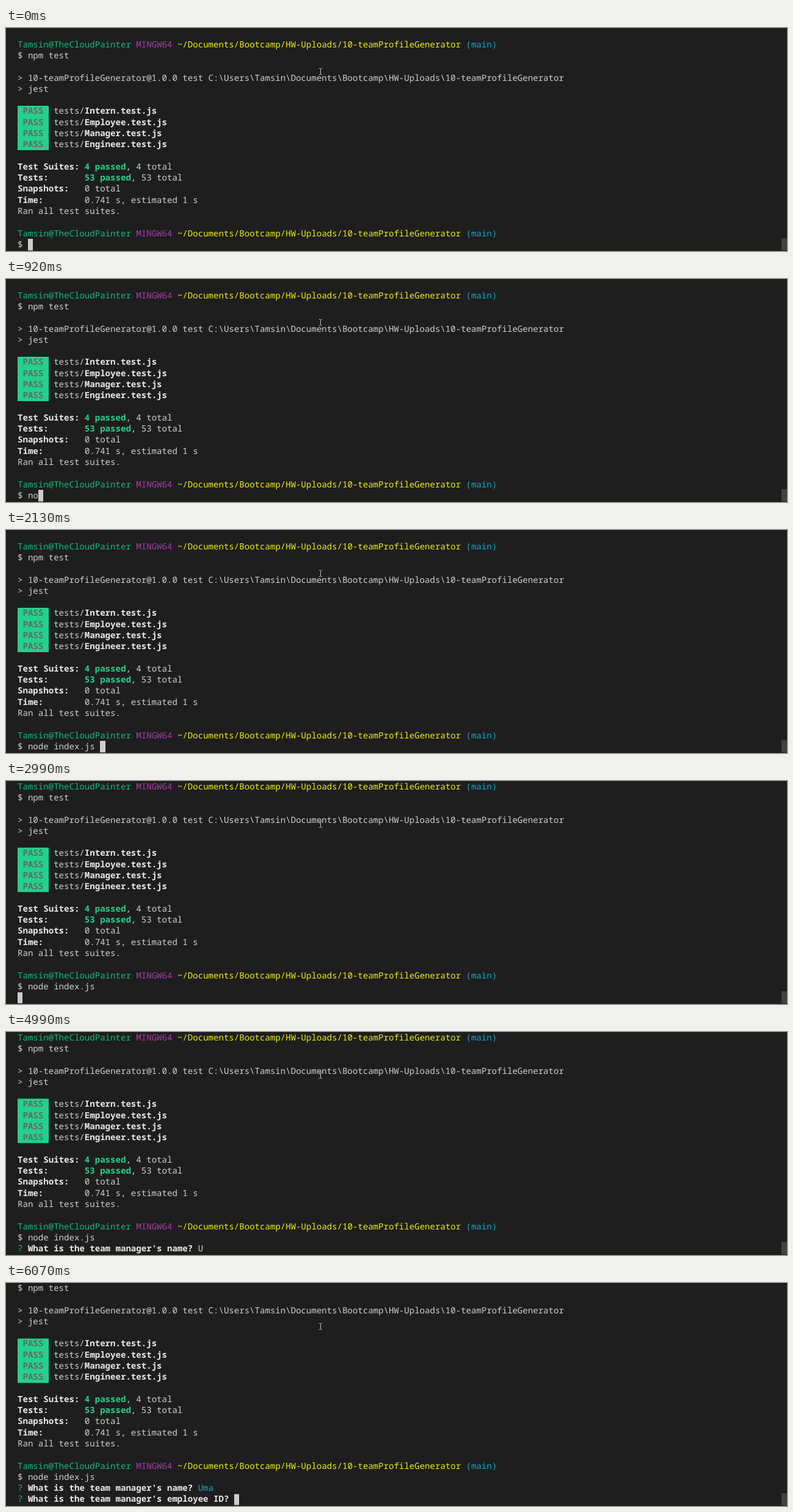
These frames come from a looping animation (1280x367 px, 8 s). An HTML page:

```html
<!DOCTYPE html>
<html lang="en">
<head>
<meta charset="utf-8">
<title>Terminal</title>
<style>
  :root { --row: 18.28px; --col: 8.448px; }
  html, body { margin: 0; width: 100%; height: 100%; overflow: hidden; background: #1e1e1e; }
  body { position: relative; }
  #screen { position: absolute; left: 19px; top: 18.3px; }
  pre {
    position: relative; top: .5px; margin: 0; color: #d0d0d0;
    font: 500 14.08px/var(--row) "Noto Sans Mono", monospace;
    text-rendering: geometricPrecision; font-variant-ligatures: none;
  }
  b { color: #e9e9e9; }
  .user { color: #0dbc79; }
  .sys { color: #a83ca8; }
  .path { color: #eded12; }
  .cyan { color: #11a8cd; }
  .ok { color: #23d18b; }
  .tag { color: #666; }
  #badge, #cursor { position: absolute; left: 0; height: var(--row); }
  #badge { top: calc(6 * var(--row)); width: calc(6 * var(--col)); height: calc(4 * var(--row)); background: #23d18b; }
  #cursor { width: var(--col); background: #ccc; }
  #slider { position: absolute; left: 1271px; top: 346px; width: 9px; height: 20px; background: #424242; }
  #pointer { position: absolute; left: 511px; top: 65px; }
</style>
</head>
<body>
<div id="screen">
<div id="badge"></div>
<pre><span class="user">Tamsin@TheCloudPainter</span> <span class="sys">MINGW64</span> <span class="path">~/Documents/Bootcamp/HW-Uploads/10-teamProfileGenerator</span> <span class="cyan">(main)</span>
$ npm test

&gt; 10-teamProfileGenerator@1.0.0 test C:\Users\Tamsin\Documents\Bootcamp\HW-Uploads\10-teamProfileGenerator
&gt; jest

<b class="tag"> PASS </b> tests/<b>Intern.test.js</b>
<b class="tag"> PASS </b> tests/<b>Employee.test.js</b>
<b class="tag"> PASS </b> tests/<b>Manager.test.js</b>
<b class="tag"> PASS </b> tests/<b>Engineer.test.js</b>

<b>Test Suites: </b><b class="ok">4 passed</b>, 4 total
<b>Tests:       </b><b class="ok">53 passed</b>, 53 total
<b>Snapshots:   </b>0 total
<b>Time:        </b>0.741 s, estimated 1 s
Ran all test suites.

<span class="user">Tamsin@TheCloudPainter</span> <span class="sys">MINGW64</span> <span class="path">~/Documents/Bootcamp/HW-Uploads/10-teamProfileGenerator</span> <span class="cyan">(main)</span>
$ <span id="command"></span>
<span id="askName"><span class="user">?</span> <b>What is the team manager's name?</b> <span id="answer"></span></span>
<span id="askId"><span class="user">?</span> <b>What is the team manager's employee ID?</b> </span></pre>
<div id="cursor"></div>
</div>
<svg id="pointer" width="9" height="13" fill="none" stroke="#c4c4c4">
  <path d="M2 1.5H3.5L4.5 2.2L5.5 1.5H7M4.5 2V11M2 11.5H3.5L4.5 10.8L5.5 11.5H7"/>
</svg>
<div id="slider"></div>
<script>
const LOOP = 8000;
const RUN = 2990, ASK_NAME = 3650, ASK_ID = 6070;
const COMMAND = "node index.js ", NAME = "Uma";

// [time in ms, characters typed so far]
const commandKeys = [[120, 1], [920, 2], [1050, 3], [1510, 4], [1710, 5], [1850, 6], [1980, 7], [2130, 14]];
const nameKeys = [[4990, 1], [5200, 2], [5530, 3]];

const el = id => document.getElementById(id);
const screenBox = el("screen"), cursor = el("cursor"), command = el("command");
const askName = el("askName"), askId = el("askId"), answer = el("answer");

const typed = (keys, t) => keys.reduce((n, [at, count]) => t >= at ? count : n, 0);
const show = (node, on) => node.style.visibility = on ? "visible" : "hidden";

function cursorColumn(t, commandLength, nameLength) {
  if (t < RUN) return 2 + commandLength;
  if (t < ASK_NAME) return 0;
  return t < ASK_ID ? 35 + nameLength : 42;
}

function draw(now) {
  const t = now % LOOP;
  const commandLength = typed(commandKeys, t), nameLength = typed(nameKeys, t);
  const scroll = (t >= RUN) + (t >= ASK_ID);

  command.textContent = COMMAND.slice(0, commandLength);
  answer.textContent = NAME.slice(0, nameLength);
  answer.className = t >= ASK_ID ? "cyan" : "";
  show(askName, t >= ASK_NAME);
  show(askId, t >= ASK_ID);

  screenBox.style.transform = `translateY(calc(${-scroll} * var(--row)))`;
  cursor.style.left = `calc(${cursorColumn(t, commandLength, nameLength)} * var(--col))`;
  cursor.style.top = `calc(${18 + scroll} * var(--row))`;
  show(cursor, t < 4990 || t >= 5060);
}

function tick() {
  draw(performance.now());
  requestAnimationFrame(tick);
}
tick();
</script>
</body>
</html>
```
